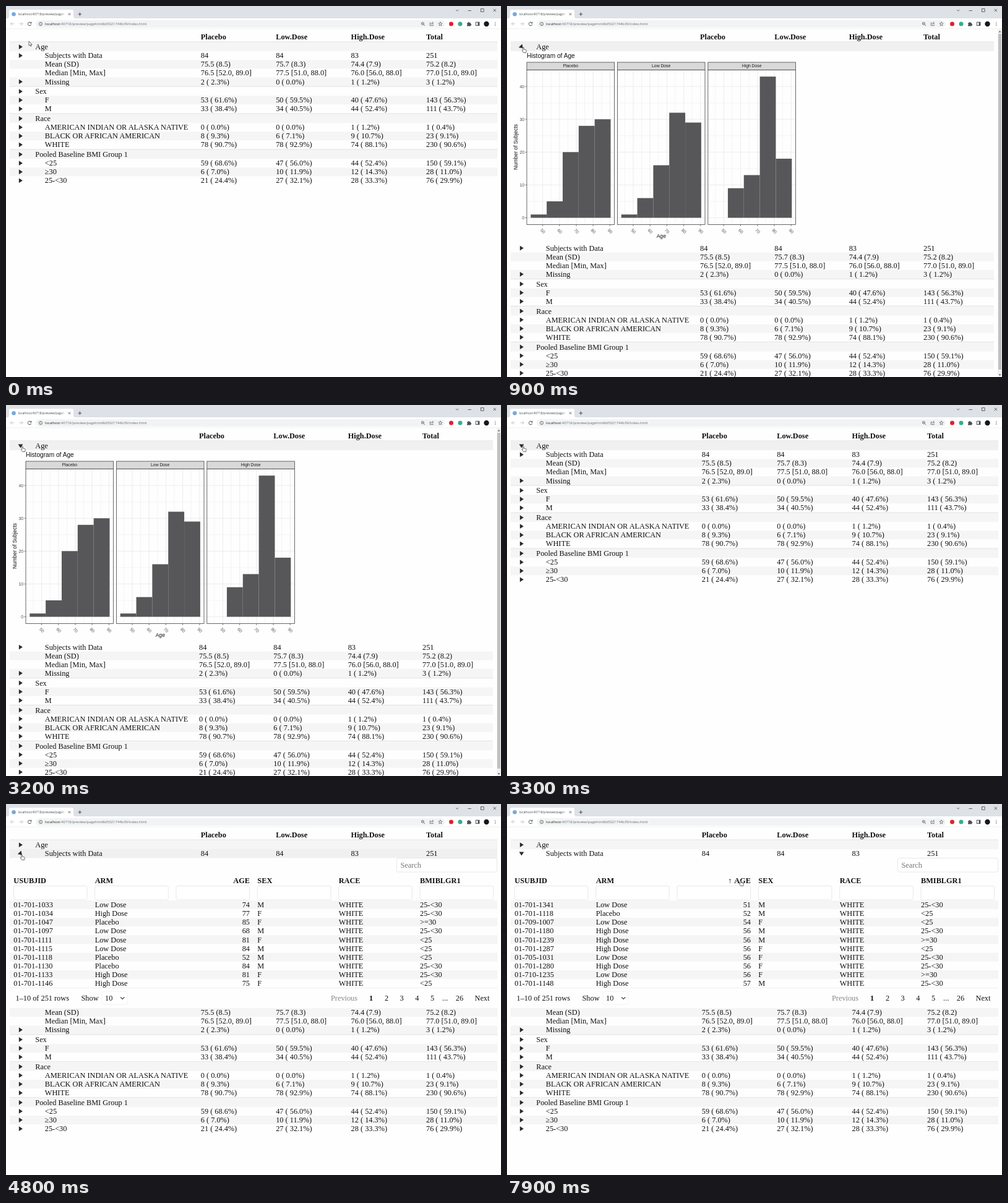
These frames come from a looping animation (800x600 px, 8 s). An HTML page:

```html
<!DOCTYPE html>
<html lang="en">
<head>
<meta charset="utf-8">
<title>Baseline table</title>
<style>
  html, body { margin: 0; width: 100%; height: 100%; overflow: hidden; background: #fff; }
  svg { display: block; width: 800px; height: 600px; }
  text { white-space: pre; }
  .serif { font: 12.3px "Liberation Serif", "Times New Roman", serif; fill: #111; }
  .bold { font-weight: bold; }
  .ui { font-family: "Open Sans", "Noto Sans", sans-serif; }
  .plot { font-family: "Liberation Sans", Arial, sans-serif; }
</style>
</head>
<body>
<svg id="stage" viewBox="0 0 800 600"></svg>
<script>
const LOOP = 8000, STEP = 100, TURN = 150;
const CHART_OPEN = 825, CHART_CLOSE = 3300, TABLE_OPEN = 4725, SORTED = 7000;
const ROW = 14.1, BORDER = 1.6;

// Each line: kind (g group, s expandable row, p plain row), label, then four values.
const SUMMARY = `g|Age
s|Subjects with Data|84|84|83|251
p|Mean (SD)|75.5 (8.5)|75.7 (8.3)|74.4 (7.9)|75.2 (8.2)
p|Median [Min, Max]|76.5 [52.0, 89.0]|77.5 [51.0, 88.0]|76.0 [56.0, 88.0]|77.0 [51.0, 89.0]
s|Missing|2 ( 2.3%)|0 ( 0.0%)|1 ( 1.2%)|3 ( 1.2%)
g|Sex
s|F|53 ( 61.6%)|50 ( 59.5%)|40 ( 47.6%)|143 ( 56.3%)
s|M|33 ( 38.4%)|34 ( 40.5%)|44 ( 52.4%)|111 ( 43.7%)
g|Race
s|AMERICAN INDIAN OR ALASKA NATIVE|0 ( 0.0%)|0 ( 0.0%)|1 ( 1.2%)|1 ( 0.4%)
s|BLACK OR AFRICAN AMERICAN|8 ( 9.3%)|6 ( 7.1%)|9 ( 10.7%)|23 ( 9.1%)
s|WHITE|78 ( 90.7%)|78 ( 92.9%)|74 ( 88.1%)|230 ( 90.6%)
g|Pooled Baseline BMI Group 1
s|<25|59 ( 68.6%)|47 ( 56.0%)|44 ( 52.4%)|150 ( 59.1%)
s|≥30|6 ( 7.0%)|10 ( 11.9%)|12 ( 14.3%)|28 ( 11.0%)
s|25-<30|21 ( 24.4%)|27 ( 32.1%)|28 ( 33.3%)|76 ( 29.9%)`.split("\n").map(l => l.split("|"));

const parseSubjects = s => s.split("\n").map(l => l.split("|"));
const BY_ID = parseSubjects(`701-1033|Low Dose|74|M|25-<30
701-1034|High Dose|77|F|25-<30
701-1047|Placebo|85|F|>=30
701-1097|Low Dose|68|M|25-<30
701-1111|Low Dose|81|F|<25
701-1115|Low Dose|84|M|<25
701-1118|Placebo|52|M|<25
701-1130|Placebo|84|M|25-<30
701-1133|High Dose|81|F|25-<30
701-1146|High Dose|75|F|<25`);
const BY_AGE = parseSubjects(`701-1341|Low Dose|51|M|25-<30
701-1118|Placebo|52|M|<25
709-1007|Low Dose|54|F|<25
701-1180|High Dose|56|M|25-<30
701-1239|High Dose|56|M|>=30
701-1287|High Dose|56|F|<25
705-1031|Low Dose|56|F|25-<30
701-1280|High Dose|56|F|25-<30
710-1235|Low Dose|56|F|>=30
701-1148|High Dose|57|M|25-<30`);

const HISTOGRAMS = [
  ["Placebo", [1, 5, 20, 28, 30]],
  ["Low Dose", [1, 6, 16, 32, 29]],
  ["High Dose", [0, 9, 13, 43, 18]],
];

// time, x, y of the pointer tip
const POINTER = [
  [0, 37, 57], [200, 37, 57], [700, 26.5, 66.5], [3700, 26.5, 66.5], [4400, 25.5, 81.5],
  [5400, 25.5, 81.5], [6200, 271.5, 122], [6300, 271.5, 122], [6800, 377.5, 123.5], [LOOP, 377.5, 123.5],
];

const clamp = v => Math.max(0, Math.min(1, v));
const ease = v => v * v * (3 - 2 * v);
const ramp = (t, start) => ease(clamp((t - start) / TURN));
const esc = s => String(s).replace(/&/g, "&amp;").replace(/</g, "&lt;").replace(/>/g, "&gt;");
const range = n => [...Array(n).keys()];

const rect = (x, y, w, h, fill, extra = "") =>
  `<rect x="${x}" y="${y}" width="${w}" height="${h}" fill="${fill}" ${extra}/>`;
const path = (d, stroke, width = 1, extra = "") =>
  `<path d="${d}" fill="none" stroke="${stroke}" stroke-width="${width}" ${extra}/>`;
const circle = (x, y, r, fill, extra = "") => `<circle cx="${x}" cy="${y}" r="${r}" fill="${fill}" ${extra}/>`;
const label = (s, x, y, cls, extra = "") => `<text x="${x}" y="${y}" class="${cls}" ${extra}>${esc(s)}</text>`;
const serif = (s, x, mid, extra = "", bold = false) =>
  label(s, x, mid + 4.1, bold ? "serif bold" : "serif", extra);
const END = 'text-anchor="end"', MIDDLE = 'text-anchor="middle"';

function browserBar() {
  const dark = "#5f6368", pale = "#bcbec2";
  return rect(0, 0, 800, 20, "#dee1e6") + rect(0, 20, 800, 17, "#fff") +
    `<path d="M2 20Q5 20 5 17V9Q5 6 8 6H106Q109 6 109 9V17Q109 20 112 20z" fill="#fff"/>` +
    circle(12.5, 13.3, 3.3, "#75aadb") +
    `<clipPath id="tab"><rect x="18" y="6" width="78" height="14"/></clipPath>` +
    `<linearGradient id="fade"><stop stop-color="#fff" stop-opacity="0"/><stop offset="1" stop-color="#fff"/></linearGradient>` +
    label("localhost:40718/preview/pagehtml", 19.5, 15.2, "ui", 'font-size="5.2" fill="#45494d" clip-path="url(#tab)"') +
    rect(88, 8, 8, 11, "url(#fade)") +
    path("M100.6 11.4l3.6 3.6m0-3.6l-3.6 3.6", dark, .9) +
    path("M116.5 13.2h5.6m-2.8-2.8v5.6", "#3c4043", .9) +
    path("M727 6l2.2 2.2L731.400 6M746.500 7.500h5.500M787.500 4.600l4.600 4.600m0-4.600l-4.600 4.600", "#444", .8) +
    rect(767.5, 4.6, 4.6, 4.6, "none", 'stroke="#444" stroke-width=".8"') +
    path("M13 28.800H7.400m2.500-2.600l-2.600 2.600l2.600 2.600M21.500 28.800h5.600m-2.500-2.600l2.600 2.600l-2.600 2.600", pale, .9) +
    path("M40.300 27.200A2.800 2.800 0 1 0 40.800 29.800M41 25.700v2.200h-2.200", "#4a4d51", 1) +
    rect(48, 23, 661, 12, "#f1f3f4", 'rx="6"') +
    circle(56, 29, 2.7, "none", `stroke="${dark}" stroke-width=".8"`) + path("M56 28.600v2M56 27.200v.7", dark, .8) +
    `<text x="63" y="31.200" class="ui" font-size="5.8" fill="#6a6e73"><tspan fill="#202124">localhost</tspan>:40718/preview/pagehtml8d5021744b39/index.html</text>` +
    circle(673.4, 28.4, 2, "none", `stroke="${dark}" stroke-width=".9"`) +
    path("M675 30l2 2M672.400 28.400h2", dark, .9) +
    path("M687 27.300h-1.800v4.300h5v-1.600M687 30q.300-2.500 3-2.500m-1-1.800l1.900 1.800l-1.900 1.800", dark, .8) +
    path("M702 25.800l.9 2.100l2.200.200l-1.700 1.500l.5 2.200l-1.900-1.200l-1.900 1.200l.5-2.200l-1.700-1.500l2.200-.200z", dark, .8) +
    circle(719.5, 29, 3.5, "#e0202c") + circle(734, 29, 3.5, "#35ad8b") +
    `<path d="M745 27.300h1.800a1.200 1.200 0 0 1 2.400 0h1.800v1.700a1.200 1.200 0 0 1 0 2.400v1h-6v-1.700a1.200 1.200 0 0 0 0-2.200z" fill="#4b4f54"/>` +
    rect(759.3, 26.2, 5.6, 5.4, "none", 'stroke="#4b4f54"') + rect(762.5, 26.2, 2.5, 5.4, "#4b4f54") +
    circle(776.5, 29, 4.2, "#15171c") +
    [26.6, 28.9, 31.2].map(y => circle(790.7, y, .7, dark)).join("") +
    rect(0, 36.6, 800, .6, "#e4e6e9");
}

function histogram() {
  const zero = 342.5, unit = 5.31;
  const tick = (s, x, y, extra) => label(s, x, y, "plot", `font-size="6.8" fill="#4d4d4d" ${extra}`);
  let out = label("Histogram of Age", 32, 84.4, "plot", 'font-size="10.15" fill="#111"') +
    label("Age", 249.3, 375.2, "plot", `font-size="8.6" fill="#111" ${MIDDLE}`) +
    label("Number of Subjects", 0, 0, "plot", `font-size="8.45" fill="#111" ${MIDDLE} transform="translate(17 228) rotate(-90)"`);
  range(5).forEach(i => {
    const y = zero - i * 10 * unit;
    out += tick(i * 10, 28, y + 2.4, END) + path(`M29.500 ${y}h2.500`, "#444", .7);
  });
  HISTOGRAMS.forEach(([name, counts], p) => {
    const left = 32 + p * 146.4, width = 141.6;
    range(9).forEach(i => {
      out += path(`M${left} ${zero - i * 5 * unit}h${width}`, "#ebebeb", i % 2 ? .5 : .9);
    });
    range(10).forEach(i => {
      const x = left + 12 + i * 13.6;
      out += path(`M${x} 103.500V353.500`, "#ebebeb", i % 2 ? .9 : .5);
      if (i % 2) {
        out += path(`M${x} 353.500v2.500`, "#444", .7) +
          tick(45 + i * 5, 0, 2.4, `${MIDDLE} transform="translate(${x + .3} 364) rotate(45)"`);
      }
    });
    counts.forEach((n, i) => {
      if (n) out += rect(left + 6.3 + i * 25.84, zero - n * unit, 25.84, n * unit, "#575658");
    });
    out += rect(left, 103.3, width, 250.2, "none", 'stroke="#444" stroke-width=".8"') +
      rect(left, 91, width, 12.3, "#d9d9d9", 'stroke="#444" stroke-width=".8"') +
      label(name, left + width / 2, 99.4, "plot", `font-size="6.8" fill="#1a1a1a" ${MIDDLE}`);
  });
  return out;
}

function subjectTable(sorted) {
  const colWidth = 131.35, box = 'stroke="#e8e8e8" rx="2.5"';
  const cell = (s, col, mid, bold) => col === 2
    ? serif(s, 394, mid, END, bold)
    : serif(s, 12.3 + col * colWidth, mid, "", bold);
  let out = rect(631.5, 87.5, 162, 22.5, "#fff", box) + serif("Search", 637.5, 99, 'style="fill:#757575"');
  ["USUBJID", "ARM", "AGE", "SEX", "RACE", "BMIBLGR1"].forEach((name, col) => {
    out += cell(name, col, 124, true) + rect(12.3 + col * colWidth, 132.5, 118.6, 22.5, "#fff", box);
  });
  if (sorted) out += serif("↑", 360, 124, MIDDLE, true);
  (sorted ? BY_AGE : BY_ID).forEach(([id, arm, age, sex, bmi], i) => {
    const mid = 163 + i * ROW;
    if (i % 2 === 0) out += rect(6, mid - ROW / 2, 788, ROW, "#f5f5f5");
    ["01-" + id, arm, age, sex, "WHITE", bmi].forEach((s, col) => out += cell(s, col, mid));
  });
  out += rect(6, 297, 788, .8, "#ececec") + serif("1–10 of 251 rows", 15.5, 314) + serif("Show", 121.5, 314) +
    rect(155, 303.5, 41, 20.5, "#fff", 'stroke="#f3f3f3" rx="2.5"') + serif("10", 160, 314) +
    path("M185 312.300l3.200 3.200l3.200-3.200", "#333", 1.1) +
    serif("Previous", 525, 314, 'style="fill:#858585"') + serif("1", 590, 314, MIDDLE, true);
  ["2", "3", "4", "5"].forEach((s, i) => out += serif(s, 615 + i * 24.7, 314, MIDDLE));
  return out + serif("...", 709.7, 314, MIDDLE) + serif("26", 733, 314, MIDDLE) + serif("Next", 757.5, 314);
}

function marker(mid, turn) {
  return `<path d="M-2.600-3.900L3.400 0L-2.600 3.900z" fill="#2b2b2b" transform="translate(23.500 ${mid}) rotate(${turn * 90})"/>`;
}

function page(t, pointer) {
  const chart = t >= CHART_OPEN && t < CHART_CLOSE, table = t >= TABLE_OPEN;
  const width = chart ? 781 : 788;
  const column = i => chart ? 312 + i * 120.35 : 314.8 + i * 121.4;
  const turns = [ramp(t, CHART_OPEN) - ramp(t, CHART_CLOSE), ramp(t, TABLE_OPEN)];
  let out = ["Placebo", "Low.Dose", "High.Dose", "Total"].map((s, i) => serif(s, column(i), 50.3, "", true)).join("");
  let top = 57.4;
  SUMMARY.forEach(([kind, name, ...values], i) => {
    const group = kind === "g";
    if (group) {
      out += rect(6, top, width, 1.2, "#e4e4e4");
      top += BORDER;
    }
    const mid = top + ROW / 2;
    const hovered = pointer.y >= top && pointer.y < top + ROW;
    if (hovered || i % 2 === 0) out += rect(6, top, width, ROW, hovered ? "#f0f0f0" : "#f5f5f5");
    if (kind !== "p") out += marker(mid, turns[i] || 0);
    out += serif(name, group ? 47.3 : 62.8, mid);
    values.forEach((s, c) => out += serif(s, column(c), mid));
    top += ROW;
    if (i === 0 && chart) top += 311.4;
    if (i === 1 && table) top += 242.8;
  });
  if (chart) {
    out += histogram() + rect(793, 37.2, 7, 562.8, "#f1f1f1") + rect(794, 45, 5, 543, "#c1c1c1") +
      `<path d="M794.500 42.500l2-2.500l2 2.500zM794.500 595.500l2 2.500l2-2.500z" fill="#606060"/>`;
  }
  return out + (table ? subjectTable(t >= SORTED) : "");
}

function pointerAt(t) {
  const i = POINTER.findIndex(k => k[0] > t);
  const [t0, x0, y0] = POINTER[i - 1], [t1, x1, y1] = POINTER[i];
  const p = ease((t - t0) / (t1 - t0));
  return { x: x0 + (x1 - x0) * p, y: y0 + (y1 - y0) * p };
}

function cursor({ x, y }, t) {
  const overHeader = t >= TABLE_OPEN && y > 117 && y < 131;
  const overMarker = x < 30 && y > 59;
  const at = `transform="translate(${x} ${y})"`;
  if (overHeader && Math.abs(x - 271.5) < 4) {
    return `<g ${at}>` + path("M-1-4V4M1-4V4M-5 0H-1M1 0H5", "#222", .9) +
      `<path d="M-5.500 0l2.400-2v4zM5.500 0l-2.400-2v4z" fill="#222"/></g>`;
  }
  const shape = overHeader || overMarker
    ? "M-.8.800Q0-.200.800.800V3.600L4 4.300Q5 4.600 4.800 5.800L4 9H.200L-2.300 5.700Q-2.200 4.700-.8 5.400z"
    : "M0 0V7.200L1.700 5.700L2.900 8.300L4 7.800L2.900 5.300H5.200z";
  return `<path d="${shape}" fill="#fff" stroke="#333" stroke-width=".7" stroke-linejoin="round" ${at}/>`;
}

const stage = document.getElementById("stage");
const chrome = browserBar();
const origin = performance.now();
let shown = -1;

function draw(t) {
  const pointer = pointerAt(t);
  stage.innerHTML = rect(0, 0, 800, 600, "#fefefe") + chrome + page(t, pointer) + cursor(pointer, t);
}

function tick() {
  const t = Math.floor(((performance.now() - origin) % LOOP) / STEP) * STEP;
  if (t !== shown) draw(shown = t);
  requestAnimationFrame(tick);
}
tick();
</script>
</body>
</html>
```
